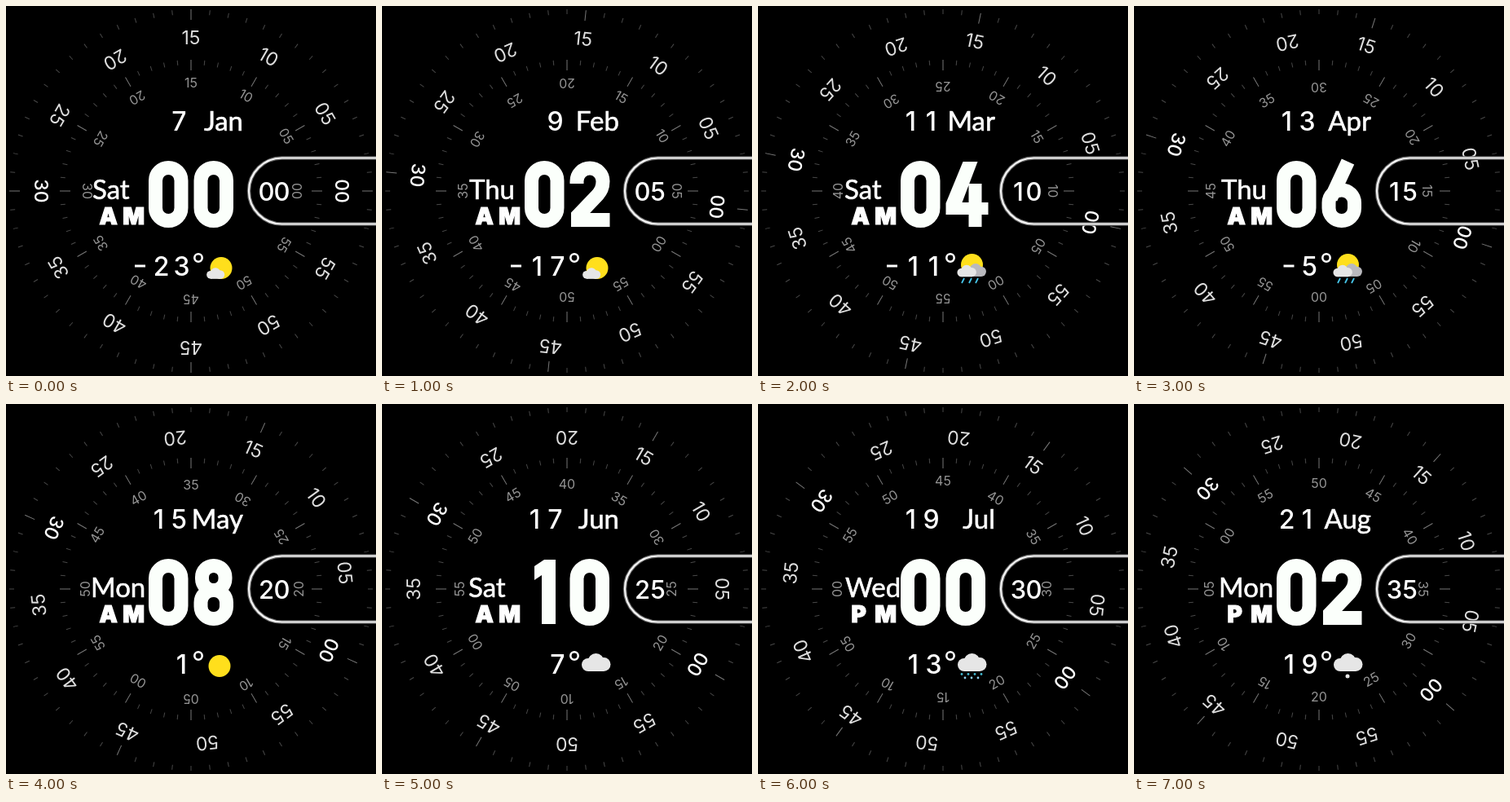
Animation of 454 by 454 pixels, one loop 8 s. Source, as an HTML page with a canvas:

```html
<!DOCTYPE html>
<html lang="en">
<head>
<meta charset="utf-8">
<title>Rotating dial watch face</title>
<style>
html, body { margin: 0; width: 100%; height: 100%; overflow: hidden; background: #000; }
canvas { display: block; }
</style>
</head>
<body>
<canvas id="face" width="454" height="454"></canvas>
<script>
const ctx = document.getElementById('face').getContext('2d');
const CENTER = 227, STEP = 1000, STEPS = 8;
const DAYS = ['Sat', 'Thu', 'Sat', 'Thu', 'Mon', 'Sat', 'Wed', 'Mon'];
const MONTHS = ['Jan', 'Feb', 'Mar', 'Apr', 'May', 'Jun', 'Jul', 'Aug'];
const WEATHER = ['partly', 'partly', 'sunRain', 'sunRain', 'sun', 'cloud', 'snow', 'flake'];
const WORDS = '33px Lato, sans-serif';

// Label radii, from 00 on in steps of five
const OUTER = { radii: [185, 190, 190, 188, 186, 186, 184, 188, 188, 192, 190, 190],
  edge: 223, majorEvery: 15, size: 23, color: '#ddd', heavy: true };
const INNER = { radii: [130, 135, 135, 133, 132, 128, 127, 128, 129, 133, 130, 132],
  edge: 161, majorEvery: 5, size: 16, color: '#949494', heavy: false };

// Large numerals in a 49 x 82 cell
const rounded = (x, y, w, h, r) => {
  const p = new Path2D();
  p.roundRect(x, y, w, h, r);
  return p;
};
const six = rounded(8.5, 36, 31.5, 37.5, 15.5);
six.addPath(new Path2D('M32 1L11 46'));
const eight = rounded(10, 8.5, 28.5, 30, 14);
eight.addPath(rounded(8.5, 38.5, 31.5, 35, 15));
const STROKED = {
  0: rounded(8.5, 8.5, 31.5, 65, 15.75),
  2: new Path2D('M8.5 28V25A16 16 0 0 1 40.5 25C40.5 33 38 37 34 42L10 67V72.5H49'),
  6: six,
  8: eight
};
const FILLED = {
  1: new Path2D('M38 1V80H21V20L12 26V9L24 1Z'),
  4: new Path2D('M21 1H39L20 51H28V28H44V51H52V66H44V81H28V66H0V52Z')
};

const pad = n => String(n).padStart(2, '0');

// An outline of the given width thickens the letters
function text(str, x, y, font, color = '#fff', align = 'center', outline = 0) {
  ctx.font = font;
  ctx.fillStyle = ctx.strokeStyle = color;
  ctx.textAlign = align;
  ctx.fillText(str, x, y);
  if (outline) {
    ctx.lineWidth = outline;
    ctx.strokeText(str, x, y);
  }
}

function line(x1, y1, x2, y2, width, color) {
  ctx.lineWidth = width;
  ctx.strokeStyle = color;
  ctx.beginPath();
  ctx.moveTo(x1, y1);
  ctx.lineTo(x2, y2);
  ctx.stroke();
}

function disc(x, y, r, color) {
  ctx.fillStyle = color;
  ctx.beginPath();
  ctx.arc(x, y, r, 0, 7);
  ctx.fill();
}

// Digits in fixed cells, the last one centred on x
function digits(value, x, y, cell, size) {
  [...String(value)].reverse().forEach((d, i) => text(d, x - i * cell, y, `450 ${size}px Inter, sans-serif`));
}

function ring({ radii, edge, majorEvery, size, color, heavy }, degrees) {
  for (let i = 0; i < 60; i++) {
    const major = i % majorEvery === 0;
    ctx.save();
    ctx.translate(CENTER, CENTER);
    ctx.rotate((degrees + 90 - i * 6) * Math.PI / 180);
    line(0, -edge, 0, -edge + (major ? 13 : 6), 1, major ? '#777' : '#484848');
    if (i % 5 === 0) {
      const bold = heavy && i % 30 === 0;
      ctx.translate(0, -radii[i / 5]);
      // 20, 25 and 30 face the centre
      if (i >= 20 && i <= 30) ctx.rotate(Math.PI);
      text(pad(i), 0, size * 0.36, `${bold ? 500 : 400} ${size}px Inter, sans-serif`, bold ? '#fff' : color);
    }
    ctx.restore();
  }
}

function pill() {
  ctx.beginPath();
  ctx.moveTo(460, 186.5);
  ctx.lineTo(338.5, 186.5);
  ctx.arc(338.5, 227, 40.5, -Math.PI / 2, Math.PI / 2, true);
  ctx.lineTo(460, 267.5);
  for (const [width, color] of [[4.5, '#666'], [2.2, '#f4f4f4']]) {
    ctx.lineWidth = width;
    ctx.strokeStyle = color;
    ctx.stroke();
  }
}

function bigDigit(d, x) {
  ctx.save();
  ctx.translate(x, 190);
  ctx.fillStyle = ctx.strokeStyle = '#fbfffb';
  ctx.lineWidth = 17;
  if (STROKED[d]) ctx.stroke(STROKED[d]);
  else ctx.fill(FILLED[d]);
  ctx.restore();
}

function cloud(x, y, scale, color) {
  ctx.save();
  ctx.translate(x, y);
  ctx.scale(scale, scale);
  disc(-9.5, 3, 8, color);
  disc(0, -1, 10, color);
  disc(9.5, 2.5, 8.5, color);
  ctx.fillRect(-9.5, 0, 19, 11);
  ctx.restore();
}

function weather(kind) {
  const yellow = '#ffdf1c', light = '#e6e6e6';
  if (kind === 'sun') disc(262, 321.5, 13.5, yellow);
  else if (kind === 'partly') {
    disc(264, 321.5, 13.5, yellow);
    cloud(257, 328, 0.62, light);
  } else if (kind === 'sunRain') {
    disc(262.5, 317.5, 13.5, yellow);
    cloud(267, 324, 0.72, '#b9b9be');
    cloud(256, 325, 0.66, light);
    for (const x of [251, 260, 268]) line(x + 2, 334, x - 1, 340, 1.8, '#45c4e8');
  } else {
    cloud(262.5, 317, 1, light);
    if (kind === 'flake') disc(262, 334, 2.5, light);
    if (kind === 'snow') {
      for (let i = 0; i < 7; i++) disc(250 + i * 4, i % 2 ? 336 : 331.5, 1.4, i % 2 ? '#8fd0ee' : '#3fb4cc');
    }
  }
}

function temperature(value) {
  const str = String(Math.abs(value));
  digits(str, 215.5, 331, 25, 32);
  if (value < 0) {
    const x = 215.5 - 25.5 * str.length;
    line(x - 6.5, 319, x + 6.5, 319, 3, '#fff');
  }
  ctx.lineWidth = 2.6;
  ctx.strokeStyle = '#fff';
  ctx.beginPath();
  ctx.arc(236, 309, 4.7, 0, 7);
  ctx.stroke();
}

function draw(step) {
  ctx.fillStyle = '#000';
  ctx.fillRect(0, 0, 454, 454);
  ring(OUTER, step * 6);
  ring(INNER, step * 30);
  pill();
  digits(pad(step * 5), 338.5, 238.5, 19, 31);

  digits(7 + step * 2, 212.5, 153, 25, 32);
  text(MONTHS[step], 291, 153, WORDS, '#fff', 'right', 0.6);

  // Align the ink, not the side bearing, with the left edge
  ctx.font = WORDS;
  ctx.textAlign = 'left';
  const bearing = ctx.measureText(DAYS[step]).actualBoundingBoxLeft;
  text(DAYS[step], 107 + bearing, 237, WORDS, '#fff', 'left', 0.6);

  const wide = '900 28px Inter, sans-serif';
  text(step < 6 ? 'A' : 'P', 114.5, 267.5, wide, '#fff', 'left', 1.2);
  text('M', 170, 267.5, wide, '#fff', 'right', 1.2);

  [...pad(step * 2 % 12)].forEach((d, i) => bigDigit(d, 175 + i * 55.5));
  temperature(step * 6 - 23);
  weather(WEATHER[step]);
}

function tick() {
  draw(Math.floor(performance.now() / STEP) % STEPS);
  requestAnimationFrame(tick);
}
tick();
</script>
</body>
</html>
```
